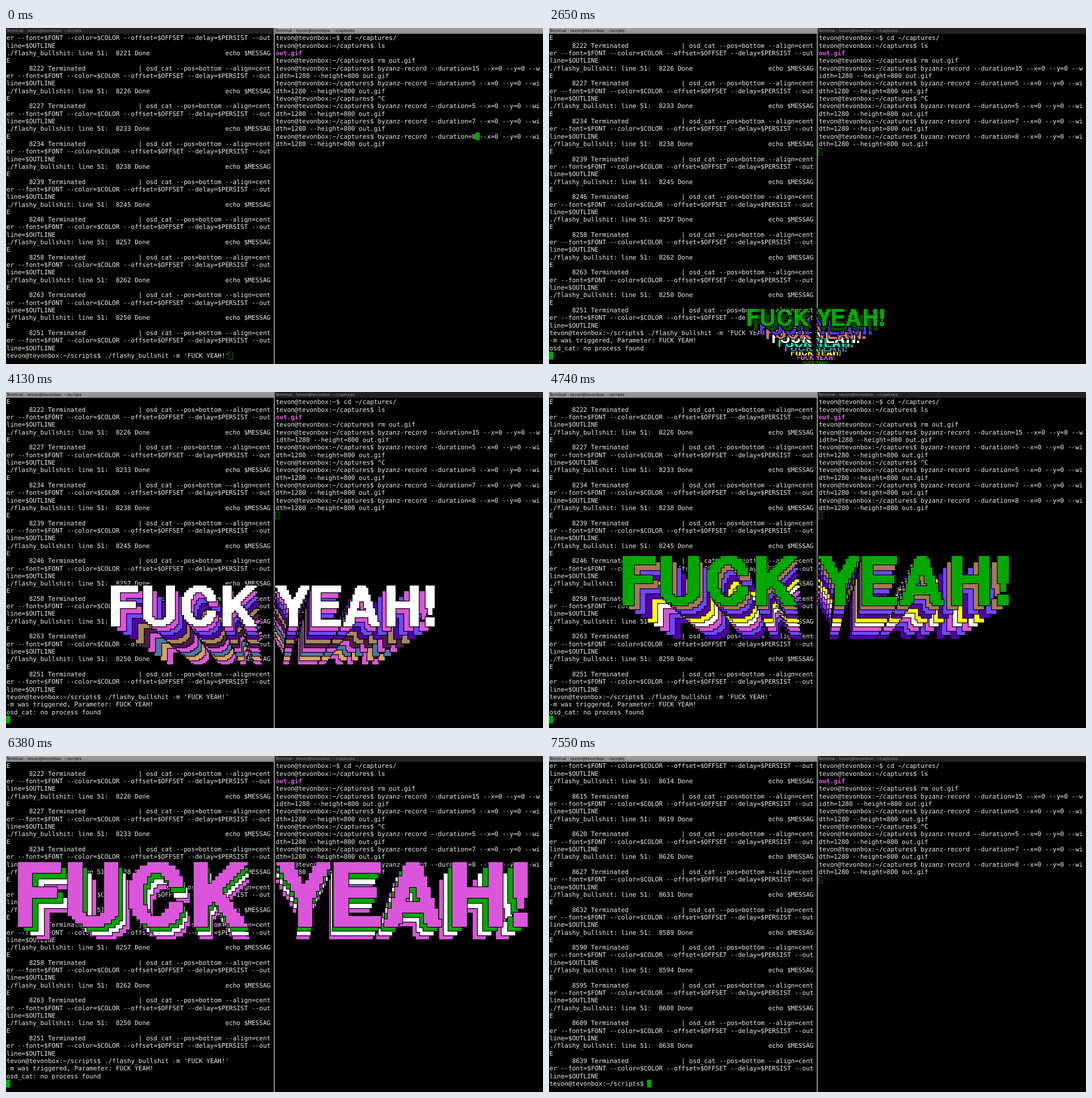
Recreate the animation shown at these times as an HTML page with a canvas. Size 947 by 592 pixels, loop 7680 ms.

```html
<!DOCTYPE html>
<html lang="en">
<head>
<meta charset="utf-8">
<title>Terminal</title>
<style>
  html, body { margin: 0; width: 100%; height: 100%; overflow: hidden; background: #000; }
  #desk { position: absolute; left: 0; top: 0; width: 1280px; height: 800px; transform: scale(.73984, .74); transform-origin: 0 0; }
  .win { position: absolute; top: 0; height: 800px; overflow: hidden; }
  #left { left: 0; width: 638px; }
  #right { left: 641px; width: 639px; }
  #split { position: absolute; left: 638px; top: 0; width: 2.5px; height: 800px; background: #8a8a8a; }
  .bar { height: 14px; font: 9.5px/13px "DejaVu Sans", sans-serif; white-space: pre; padding-left: 1px; background: #222; color: #969696; text-rendering: geometricPrecision; }
  .focus .bar { background: linear-gradient(#a0a0a0, #8a8a8a); color: #0a0a0a; }
  pre { position: absolute; left: 1px; top: 15px; margin: 0; font: 14.95px/18px "DejaVu Sans Mono", monospace; color: #ececec; text-rendering: geometricPrecision; }
  #right pre { left: 2px; }
  pre b { color: #e65ae6; }
  .cur { position: absolute; box-sizing: border-box; width: 10px; height: 18px; border: 1px solid #0a0; }
  .cur.on { background: #0a0; }
  canvas { position: absolute; left: 0; top: 0; }
</style>
</head>
<body>
<div id="desk">
  <div id="left" class="win"><div class="bar">Terminal - tevon@tevonbox: ~/scripts</div><pre></pre><div class="cur"></div></div>
  <div id="right" class="win"><div class="bar">Terminal - tevon@tevonbox: ~/captures</div><pre></pre><div class="cur"></div></div>
  <div id="split"></div>
</div>
<canvas width="947" height="592"></canvas>
<script>
const LOOP = 7680, ENTER = 1800, END = 7550, ROWS = 43, COLS = 70;
const $ = q => document.querySelector(q);

// Terminal text
const wrap = s => s.match(new RegExp(`.{1,${COLS}}`, 'g'));
const user = 'tevon@tevonbox:';
const shout = 'FUCK YEAH!';
const prompt = `${user}~/scripts$ `;
const command = `${prompt}./flashy_bullshit -m '${shout}'`;

const job = pid => [
  ...wrap(`./flashy_bullshit: line 51:  ${pid} Done${' '.repeat(20)}echo $MESSAGE`),
  ...wrap(`      ${pid + 1} Terminated${' '.repeat(14)}| osd_cat --pos=bottom --align=center` +
    ' --font=$FONT --color=$COLOR --offset=$OFFSET --delay=$PERSIST --outline=$OUTLINE')
];
const screen = (pids, tail) =>
  [...job(pids[0]).slice(-2), ...pids.flatMap(job), ...tail].slice(-ROWS).join('\n');

const oldJobs = [8221, 8226, 8233, 8238, 8245, 8257, 8262, 8250];
const newJobs = [8614, 8619, 8626, 8631, 8589, 8594, 8608, 8638];
const screens = [
  screen(oldJobs, [command]),
  screen(oldJobs, [command, `-m was triggered, Parameter: ${shout}`, 'osd_cat: no process found', '']),
  screen(newJobs, [prompt])
];
const cursorCol = [command.length, 0, prompt.length];

const record = d => `byzanz-record --duration=${d} --x=0 --y=0 --width=1280 --height=800 out.gif`;
const cap = cmd => wrap(`${user}~/captures$ ${cmd}`);
$('#right pre').innerHTML = [
  `${user}~$ cd ~/captures/`, ...cap('ls'), '<b>out.gif</b>', ...cap('rm out.gif'),
  ...cap(record(15)), ...cap(record(5)), ...cap('^C'),
  ...cap(record(5)), ...cap(record(7)), ...cap(record(8))
].join('\n');

function cursor(id, col, row, on) {
  const c = $(id + ' .cur');
  c.style.left = (id === '#left' ? 0 : 1) + col * 9 + 'px';
  c.style.top = 15 + row * 18 + 'px';
  c.classList.toggle('on', on);
}

let shown = '';
function drawWindows(t) {
  const stage = t < ENTER ? 0 : t < END ? 1 : 2;
  const swapped = t >= 510, keyed = t >= 560, started = t >= 50;
  const key = [stage, swapped, keyed, started].join();
  if (key === shown) return;
  shown = key;
  $('#left').classList.toggle('focus', swapped);
  $('#right').classList.toggle('focus', !swapped);
  $('#left pre').textContent = screens[stage];
  cursor('#left', cursorCol[stage], ROWS - 1, keyed);
  cursor('#right', started ? 0 : 53, started ? 15 : 13, !keyed);
}

// Chunky lettering: outlines sampled on a coarse grid
const GW = 142, GH = 18, runs = [];
const glyphs = new Path2D([
  'M0 0h12v3h-8v4h7v3h-7v8h-4z',
  'M14 0h4v11q0 4 3 4t3-4v-11h4v12q0 6-7 6t-7-6z',
  'M46.3 6.5q-1-6.5-7.5-6.5q-7.8 0-7.8 9t7.8 9q6.7 0 7.7-7h-4q-.8 3.8-3.7 3.8q-3.7 0-3.7-5.8t3.7-5.8q2.8 0 3.5 3.3z',
  'M49 0h4v7l6-7h5l-7 8 7.5 10h-5l-5-7-1.5 2v5h-4z',
  'M72 0h4.6l3.2 7 3.2-7h4.4l-5.4 11v7h-4v-7z',
  'M88 0h13v3h-9v4h8v3h-8v5h9v3h-13z',
  'M108 0h4l6 18h-4l-1.4-4h-5.2l-1.4 4h-4zM110 5l-1.7 6h3.4z',
  'M121 0h4v7h6v-7h4v18h-4v-8h-6v8h-4z',
  'M138 0h4v6l-1 7h-2l-1-7zM138 14h4v4h-4z'
].join(''));
const ctx = $('canvas').getContext('2d');
for (let y = 0; y < GH; y++) {
  let start = -1;
  for (let x = 0; x <= GW; x++) {
    const on = x < GW && ctx.isPointInPath(glyphs, x + .5, y + .5, 'evenodd');
    if (on && start < 0) start = x;
    if (!on && start >= 0) { runs.push([start, x, y]); start = -1; }
  }
}

// Layers grow and rise, appear ever more slowly and persist for LIFE
const FIRST = -7, LAST = 32, LIFE = 955, FLASH = 6380;
const born = n => 2440 + 88 * n + .66 * n * n;
const gone = n => n < LAST ? born(n) + LIFE : END;
const base = n => 301 + 7.47 * (LAST - n);
const scale = n => .1545 * (n + 9);

const ink = {
  v: '#6f48ff', d: '#004a00', g: '#00a800', s: '#4a78a8', y: '#ffff00', e: '#9ab89a', l: '#aaff00',
  m: '#4c1f44', p: '#da55da', t: '#d2a268', b: '#a88858', i: '#5200a8', w: '#ffffff', a: '#00ffaa',
  o: '#a87858', r: '#cd7270', c: '#9c1c62', u: '#5a30e8'
};
const order = 'gpysawrudgsyelmptspmbivpwyivogaircslpwg';
const flashes = 'vpyslra';

function color(n, t) {
  return ink[n < LAST ? order[n - FIRST] : flashes[Math.max(0, 1 + Math.floor((t - FLASH) / 190))]];
}

function drawLayer(n, fill) {
  const s = scale(n), x0 = 470.5 - GW * s / 2, y0 = base(n) - GH * s;
  const px = x => Math.round(x0 + x * s), py = y => Math.round(y0 + y * s);
  ctx.beginPath();
  for (const [a, b, y] of runs) ctx.rect(px(a), py(y), px(b) - px(a), py(y + 1) - py(y));
  ctx.stroke();
  ctx.fillStyle = fill;
  ctx.fill();
}

function drawLayers(t) {
  ctx.clearRect(0, 0, 947, 592);
  ctx.strokeStyle = '#000';
  ctx.lineWidth = 2.4;
  for (let n = FIRST; n <= LAST; n++) {
    if (t >= born(n) && t < gone(n)) drawLayer(n, color(n, t));
  }
}

const t0 = performance.now();
function tick() {
  const t = (performance.now() - t0) % LOOP;
  drawWindows(t);
  drawLayers(t);
  requestAnimationFrame(tick);
}
tick();
</script>
</body>
</html>
```
